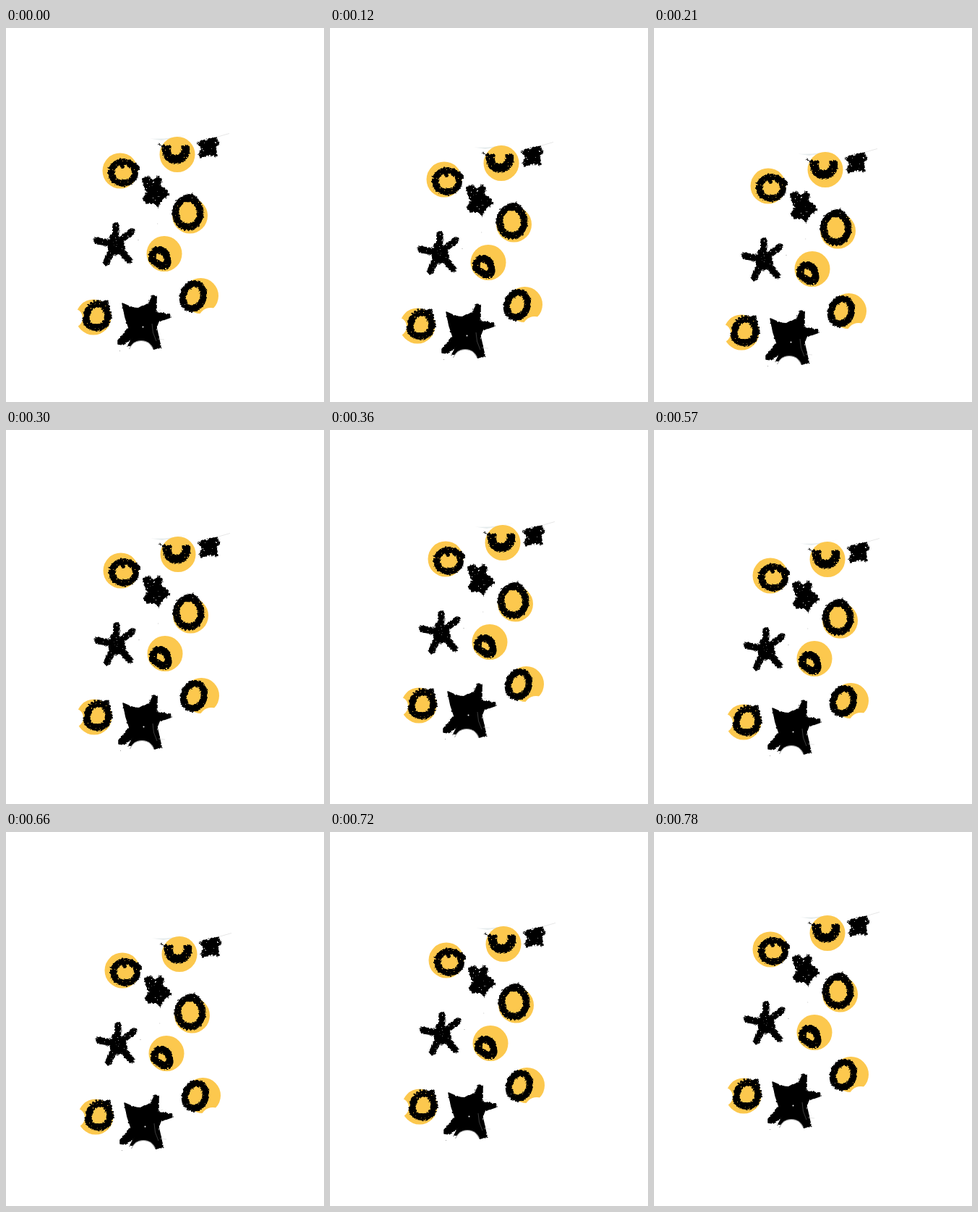
Animation of 440x516 px, one loop 0.91 s. Source, as an HTML page:

```html
<!DOCTYPE html>
<html lang="en">
<head>
<meta charset="utf-8">
<title>Stars and rings</title>
<style>
  html, body { margin: 0; width: 100%; height: 100%; overflow: hidden; background: #fff; }
  svg { display: block; width: 440px; height: 516px; }
  .ink { fill: none; stroke: #000; stroke-width: 9.5; stroke-linecap: round; stroke-linejoin: round; }
  .solid { fill: #000; stroke-width: 1.6; }
  .hair { fill: none; stroke: #ccc; stroke-width: .5; }
</style>
</head>
<body>
<svg viewBox="0 0 440 516">
  <defs>
    <filter id="crayon" filterUnits="userSpaceOnUse" x="90" y="130" width="230" height="330" color-interpolation-filters="sRGB">
      <feTurbulence type="fractalNoise" baseFrequency=".35" numOctaves="2" seed="4" result="n"/>
      <feDisplacementMap in="SourceGraphic" in2="n" scale="4.500" xChannelSelector="R" yChannelSelector="G" result="rough"/>
      <feColorMatrix in="n" values="0 0 0 0 0  0 0 0 0 0  0 0 0 0 0  0 0 14 0 -10.300" result="grain"/>
      <feComposite in="rough" in2="grain" operator="out"/>
    </filter>
    <filter id="edge" filterUnits="userSpaceOnUse" x="90" y="130" width="230" height="330" color-interpolation-filters="sRGB">
      <feTurbulence type="fractalNoise" baseFrequency=".2" numOctaves="2" seed="9" result="n"/>
      <feDisplacementMap in="SourceGraphic" in2="n" scale="3" xChannelSelector="R" yChannelSelector="G"/>
    </filter>
  </defs>
  <g id="art">
    <path d="M199 152.500Q225 154 252 147Q234 152.500 215 155Z" fill="#e6eced"/>
    <path class="hair" d="M288 151.500L309 145.500"/>
    <g id="discs" fill="#fcc84e"></g>
    <circle cx="93" cy="400" r="13" fill="#fff"/>
    <circle cx="283" cy="403" r="17" fill="#fff"/>

    <g class="ink" filter="url(#crayon)">
      <ellipse cx="162" cy="199.500" rx="16.500" ry="14.800" stroke-width="9"/>
      <path d="M161 187V191M179 189L182 193" stroke-width="6"/>
      <path class="solid" d="M216 162L228 163Q225 176 235 176Q246 175 243 163L253 162Q255 174 249 181Q243 187 235 187Q226 187 220 180Q216 174 216 162Z"/>
      <path d="M211 160.500L218 162" stroke-width="1.500"/>
      <ellipse cx="251.700" cy="255" rx="17" ry="19.500"/>
      <path d="M247 235L257 233L261 238" stroke-width="9"/>
      <path d="M207 307Q201 312 202 319Q208 326 219 329Q225 327 223 318Q221 308 214 306Z" stroke-width="10"/>
      <ellipse cx="259" cy="370" rx="14" ry="17.500" transform="rotate(20 259 370)"/>
      <path d="M122 381Q112 387 111 400Q110 412 123 413Q135 414 139 405Q142 398 139 391Q137 382 130 381Z"/>
      <path d="M138 379L140 388L143 398" stroke-width="7.500"/>
      <path class="solid" d="M265 158L291 151L294 160L290 166L292 177L281 175L269 179L267 174L271 167Z"/>
      <path class="solid" d="M189 208L198 205L203 211L209 205L215 208L214 219L223 224L225 231L216 236L210 247L203 241L194 242L190 236L195 226L190 216Z"/>
      <path d="M151 298L152 273M151 298L174 281M151 298L170 320M151 298L139 323M151 298L126 293.500"/>
      <path class="solid" d="M145 285L161 291L165 308L150 313L141 304Z"/>
    </g>

    <g filter="url(#edge)" stroke="#000" stroke-width="1.500" stroke-linejoin="round">
      <path d="M161 380L168 383L181 388L192 382L197 381L203 369L208 370L208 393L226 395L228 399L211 405L208 413L214 440L205 443L169 438L175 427L162 437L155 436L155 431L170 414L165 399Z"/>
    </g>
    <path d="M207 391L214 389M210 429L219 430" class="hair"/>
    <path d="M202 408Q202 421 208 432" class="hair" stroke-opacity=".6"/>
    <circle cx="189.500" cy="412.500" r="1" fill="#fff"/>
    <circle cx="187" cy="449" r="17.500" fill="#fff"/>
    <path d="M170.500 443Q175 431.500 187 431.500Q199 431.500 203.500 442" fill="none" stroke="#999" stroke-width="1"/>
    <path d="M182.500 292.500h1M157 445.500h1M209.500 270h.6" stroke="#888" stroke-width=".8"/>
  </g>
</svg>
<script>
  const LOOP = 910, STEP = 30, LAST = 780;
  const art = document.getElementById('art');

  const centers = [[158, 197], [237, 174.5], [254.5, 259], [219, 311.5], [269.5, 369.5], [121, 399]];
  document.getElementById('discs').innerHTML = centers
    .map(([x, y]) => `<circle cx="${x}" cy="${y}" r="24.5"/>`).join('');

  // Straight moves between turning points: [ms, offset]
  const slide = [[0, 0], [210, 0], [390, 3], [LAST, 3]];
  const bob = [[0, 0], [210, 21], [390, -27], [600, 9], [LAST, -35]];

  function at(keys, t) {
    let i = 1;
    while (i < keys.length - 1 && t > keys[i][0]) i++;
    const [t0, a] = keys[i - 1], [t1, b] = keys[i];
    return Math.round(a + (b - a) * (t - t0) / (t1 - t0) - 0.01);
  }

  function draw(ms) {
    const t = Math.min(LAST, Math.floor((ms % LOOP) / STEP) * STEP);
    art.setAttribute('transform', `translate(${at(slide, t)} ${at(bob, t)})`);
  }

  const start = performance.now();
  function tick() {
    draw(performance.now() - start);
    requestAnimationFrame(tick);
  }
  tick();
</script>
</body>
</html>
```
